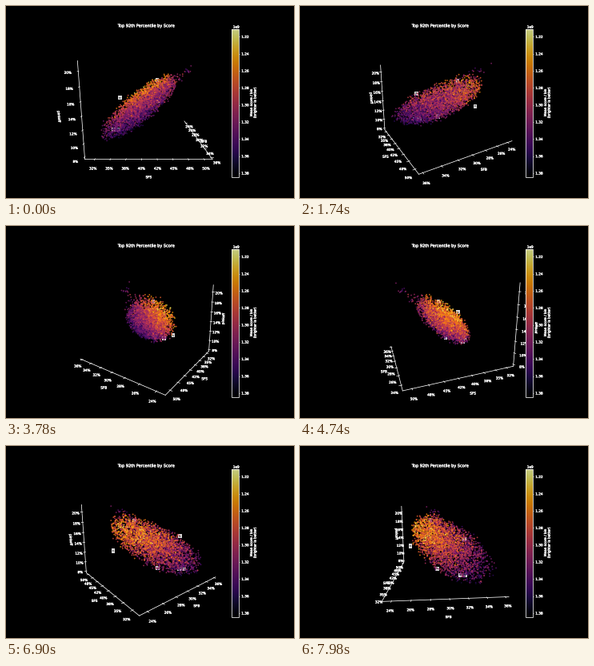
These frames come from a looping animation (360x240 px, 8 s). A matplotlib script:

```python
import numpy as np
import matplotlib.pyplot as plt
from matplotlib.animation import FuncAnimation
from matplotlib.patheffects import withStroke
from matplotlib.text import Text
from matplotlib.ticker import PercentFormatter

plt.style.use("dark_background")
plt.rcParams.update({"font.family": "DejaVu Sans", "axes.linewidth": 1.8,
                     "xtick.major.width": 1.6, "ytick.major.width": 1.6})

LOOP, STEP = 8000, 40          # ms
HOLD, TURN = 60, 2             # the view turns 2 degrees every 60 ms
LIMITS = np.array([(23.05, 36.4), (30.9, 51.35), (7.65, 21.35)])
BOX = np.array([1.19, 1.19, 0.893])
LOW, HIGH = 1.2109e9, 1.3843e9

# the cloud is a tilted ellipsoid: centre, then length, width and thickness
CENTRE = np.array([0.02, -0.06, -0.03])
AXES = np.array([(-0.08, 0.38, 0.28), (0.45, -0.20, -0.12), (0.0, -0.08, 0.15)])


def to_percent(p):
    """Map centred box coordinates to axis values."""
    return LIMITS.mean(axis=1) + np.asarray(p) / BOX * np.ptp(LIMITS, axis=1)


def make_cloud(rng, n=3600, tail=50):
    ball = rng.normal(size=(n, 3))
    ball *= (rng.random(n) ** 0.42 / np.linalg.norm(ball, axis=1))[:, None]
    ball[:, 1] *= np.where(ball[:, 1] > 0, 1.08, 0.92)
    ball[:tail] *= 0.25
    ball[:tail, 0] = 0.8 + 0.85 * rng.random(tail) ** 1.6
    a, b, c = ball.T
    shade = 0.5 + 0.24 * b - 0.23 * c - 0.04 * a + 0.12 * a ** 2
    shade = np.clip(shade + rng.normal(0, 0.1, n), 0.08, 0.9)
    place = CENTRE + ball @ AXES + rng.normal(0, 0.018, (n, 3))
    return to_percent(place), LOW + shade * (HIGH - LOW)


fig = plt.figure(figsize=(12, 8), dpi=30)
ax = fig.add_subplot(projection="3d")
ax.set_proj_type("persp", focal_length=0.2)

points, score = make_cloud(np.random.default_rng(92))
dots = ax.scatter(*points.T, c=score, cmap="inferno_r", vmin=LOW, vmax=HIGH,
                  s=10, alpha=0.8)

ax.set(xlim=LIMITS[0], ylim=LIMITS[1], zlim=LIMITS[2],
       xticks=np.arange(24, 37, 2), yticks=np.arange(32.5, 51, 2.5),
       zticks=np.arange(8, 21, 2),
       xlabel="SFB", ylabel="SFS", zlabel="pinkoff",
       title="Top 92th Percentile by Score")
ax.grid(False)
for axis in (ax.xaxis, ax.yaxis, ax.zaxis):
    axis.set_pane_color((0, 0, 0, 1))
    axis.set_major_formatter(PercentFormatter(100, decimals=0))

bar = fig.colorbar(dots, ax=ax)
bar.set_label("Mean score / bin\n(brighter is better)")
bar.ax.invert_yaxis()

# a thin outline keeps the tiny lettering bright
for text in fig.findobj(Text):
    text.set_path_effects([withStroke(linewidth=0.8, foreground="white")])

layouts = {
    "qwerty": (0.19, -0.38, -0.303),
    "ne": (0.21, -0.32, 0.075),
    "ro": (-0.42, 0.14, -0.088),
    "st": (-0.145, 0.11, 0.25),
    "ha": (-0.08, -0.25, -0.27),
}
for name, place in layouts.items():
    ax.text(*to_percent(place), name, size=7, color="black", zorder=1,
            ha="center", va="center",
            bbox=dict(facecolor="white", edgecolor="none", alpha=0.85, pad=1.5))


def update(k):
    turns = (k * STEP + STEP // 2) // HOLD
    # the tiny offset keeps the axis edges stable at right angles
    ax.view_init(elev=10, azim=TURN * turns + 0.001)
    return [dots]


anim = FuncAnimation(fig, update, frames=LOOP // STEP, interval=STEP,
                     init_func=lambda: update(0), repeat=True, repeat_delay=0)
plt.show()
```
